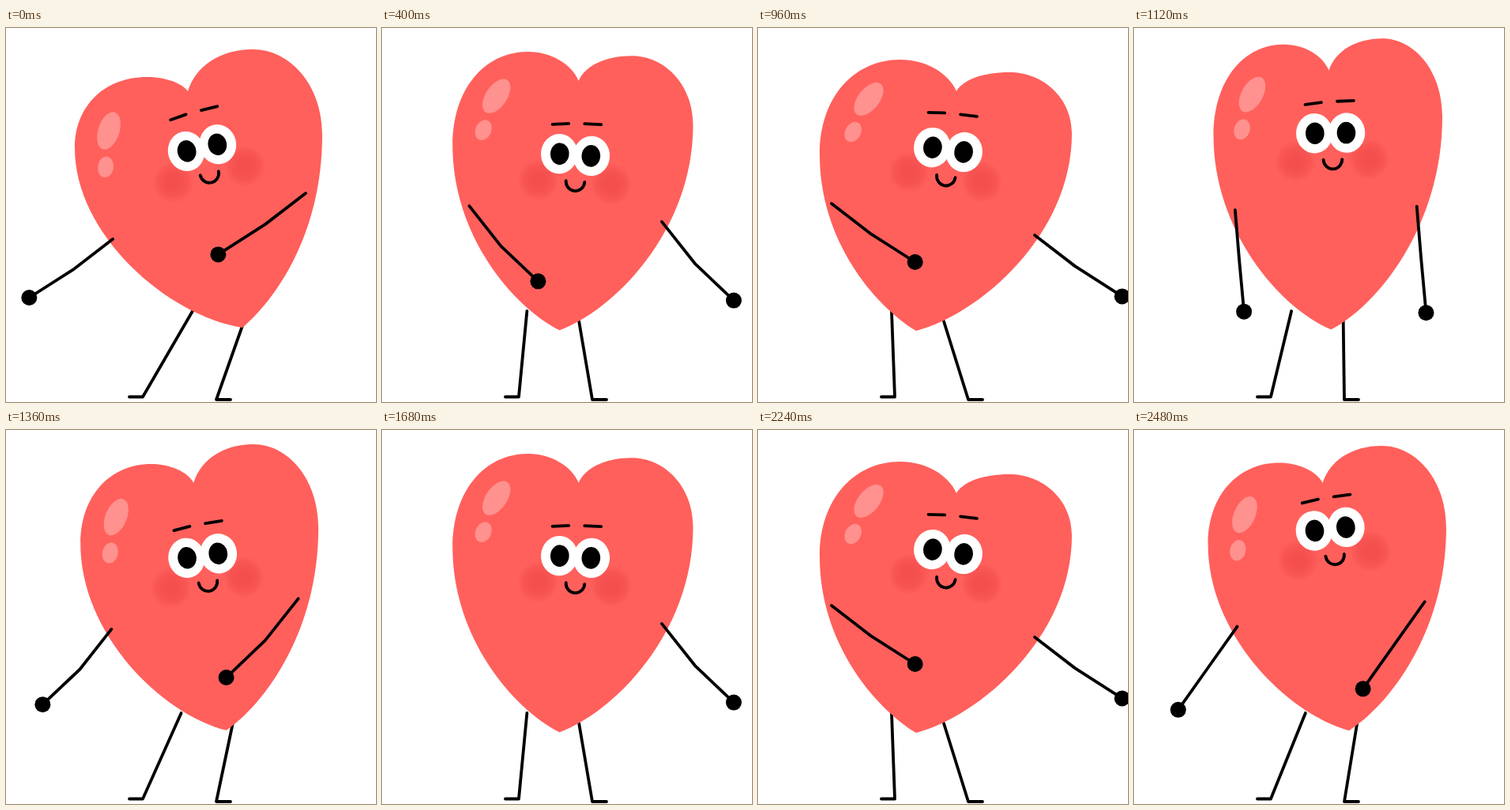
Animation, 468 px wide and 473 px high, one loop 2560 ms. Source, as an HTML page with a canvas:

```html
<!DOCTYPE html>
<html lang="en">
<head>
<meta charset="utf-8">
<title>Dancing heart</title>
<style>
html, body { margin: 0; width: 100%; height: 100%; overflow: hidden; background: #fff; }
canvas { display: block; }
</style>
</head>
<body>
<canvas id="stage" width="468" height="473"></canvas>
<script>
const ctx = document.getElementById('stage').getContext('2d');
const STEP = 80, STEPS = 32, SWAY = 8;
const RED = '#ff605c', SHINE = '#ff918e', INK = '#000';
const rad = degrees => degrees * Math.PI / 180;

function line(...points) {
  ctx.beginPath();
  points.forEach(p => ctx.lineTo(...p));
  ctx.stroke();
}

function ellipse(x, y, rx, ry, color, angle = 0) {
  ctx.beginPath();
  ctx.ellipse(x, y, rx, ry, angle, 0, Math.PI * 2);
  ctx.fillStyle = color;
  ctx.fill();
}

function heart([nx, ny], [ax, ay], [lx, ly], [tx, ty], [rx, ry], [bx, by]) {
  const wl = tx - lx, wr = rx - tx;
  ctx.beginPath();
  ctx.moveTo(nx, ny);
  ctx.bezierCurveTo(nx + .14 * (ax - nx), ny + .58 * (ay - ny), ax + .45 * (nx - ax), ay, ax, ay);
  ctx.bezierCurveTo(ax + .57 * (lx - ax), ay, lx, ly + .61 * (ay - ly), lx, ly);
  ctx.bezierCurveTo(lx, ly + .48 * (ty - ly), tx - .45 * wl, ty - 58 + .2 * wl, tx, ty);
  ctx.bezierCurveTo(tx + .4 * wr, ty - 48 + .14 * wr, rx, ry + .52 * (ty - ry), rx, ry);
  ctx.bezierCurveTo(rx, ry + .58 * (by - ry), bx + .54 * (rx - bx), by, bx, by);
  ctx.bezierCurveTo(bx + .5 * (nx - bx), by, nx + .12 * (bx - nx), ny + .6 * (by - ny), nx, ny);
  ctx.fillStyle = RED;
  ctx.fill();
}

function arm([x, y], length, angle, bend) {
  const dx = length * Math.sin(angle), dy = length * Math.cos(angle);
  line([x, y], [x + .46 * dx, y + .46 * dy + bend], [x + dx, y + dy]);
  ellipse(x + dx, y + dy, 10, 10, INK);
}

function cheek(x, y) {
  const glow = ctx.createRadialGradient(x, y, 8, x, y, 26);
  glow.addColorStop(0, 'rgba(243,78,77,.95)');
  glow.addColorStop(.55, 'rgba(243,78,77,.65)');
  glow.addColorStop(1, 'rgba(243,78,77,0)');
  ellipse(x, y, 26, 26, glow);
}

function face([x, y], angle, browY) {
  ctx.save();
  ctx.translate(x, y);
  ctx.rotate(angle);
  cheek(-45, 35);
  cheek(48, 34);
  for (const side of [-1, 1]) ellipse(side * 20.4, 0, 23.2, 25.2, '#fff');
  for (const side of [-1, 1]) ellipse(side * 19.8, 0, 11.8, 13.8, INK);
  line([-31.5, browY + 2.5], [-11, browY]);
  line([9, browY - 1], [30, browY - 1.5]);
  ctx.beginPath();
  ctx.ellipse(2.2, 33.5, 11.8, 12, 0, 0, Math.PI);
  ctx.stroke();
  ctx.restore();
}

function shine([x, y], angle) {
  const lean = angle + .3;
  ellipse(x, y, 13.5, 24.5, SHINE, angle + .53);
  ellipse(x - 46 * Math.sin(lean), y + 46 * Math.cos(lean), 10, 13.3, SHINE, angle + .35);
}

function draw(step) {
  const sway = step / SWAY * Math.PI * 2;
  const cos = Math.cos(sway), sin = Math.sin(sway);
  const lean = cos * Math.abs(cos) + .1 * sin;  // 1 is right, -1 is left
  const stretch = sin * sin;                    // tall and thin when upright
  const bounce = Math.sin(2 * sway);
  const tilt = rad(-2 - 10.3 * lean);

  // Blends the right and left lean of a point, then stretches it from the tip.
  const at = (rightX, rightY, leftX, leftY) => {
    const x = leftX + (rightX - leftX) * (1 + lean) / 2;
    const y = leftY + (rightY - leftY) * (1 + lean) / 2;
    return [300 + (x - 300) * (1 - .085 * stretch), 380 + (y - 380) * (1 + .088 * stretch)];
  };

  const armAngle = rad(-55 * cos - 5 * sin), bend = 3.5 + 3.5 * bounce;
  const leftArm = () => arm(at(135, 267, 93, 222), 129, armAngle, bend);
  const rightArm = () => arm(at(379, 209, 350, 262), 135, armAngle, bend);
  const leftBehind = Math.abs(step - 20) < 2, rightBehind = Math.abs(step - 24) < 2;

  ctx.clearRect(0, 0, 468, 473);
  ctx.lineWidth = 3.8;
  ctx.lineCap = ctx.lineJoin = 'round';
  ctx.strokeStyle = INK;

  line([202.5 + 33.5 * lean, 358], [173, 466.5], [156, 466.5]);
  line([268 + 33 * lean, 371], [266, 470], [284, 470]);
  if (leftBehind) leftArm();
  if (rightBehind) rightArm();

  heart(at(230, 80, 251, 80), at(178, 62, 180, 40), at(87, 152, 78, 160),
        at(299, 379, 200, 383), at(400, 135, 397, 133), at(312, 27, 318, 56));
  shine(at(130, 130, 140, 90), tilt);
  const [eyeX, eyeY] = at(248, 151.5, 240.5, 154);
  face([eyeX, eyeY + 17 * bounce], tilt, -39 - 6.5 * Math.max(0, Math.cos(2 * sway)));

  if (!leftBehind) leftArm();
  if (!rightBehind) rightArm();
}

function tick() {
  draw(Math.floor(performance.now() / STEP) % STEPS);
  requestAnimationFrame(tick);
}
tick();
</script>
</body>
</html>
```
